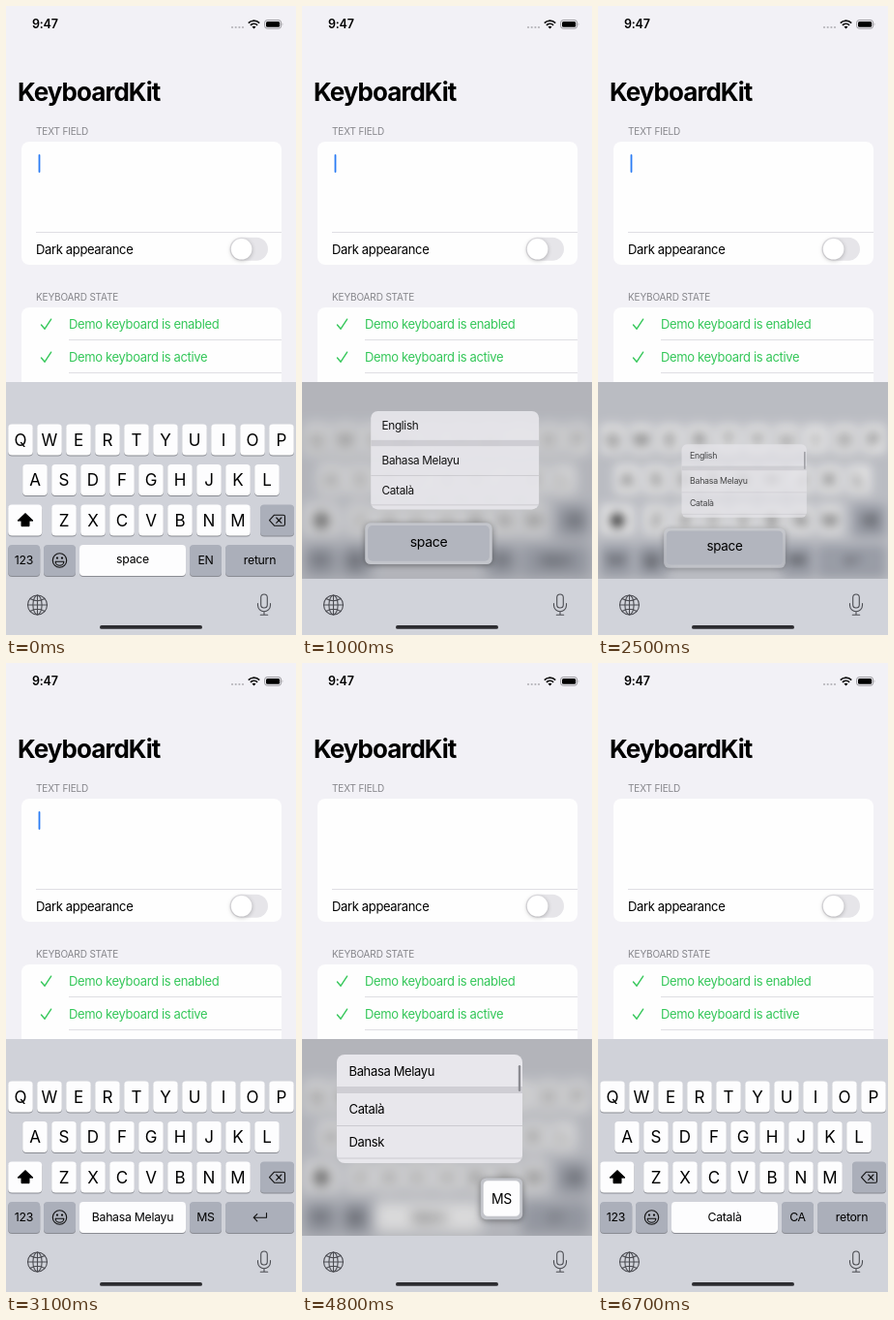
An HTML page that plays this animation: 300x649 px, repeating every 6900 ms.

```html
<!DOCTYPE html>
<html lang="en">
<head>
<meta charset="utf-8">
<title>Keyboard locale menu</title>
<style>
@property --t { syntax: '<number>'; inherits: true; initial-value: 0; }
@keyframes clock { to { --t: 6900; } }

html, body { margin: 0; width: 100%; height: 100%; overflow: hidden; background: #f2f1f6; }

/* The picture advances ten times a second; the small lead avoids rounding at the steps. */
svg {
  display: block; width: 300px; height: 649px;
  font: 13px Inter, Roboto, sans-serif; letter-spacing: -.35px;
  animation: clock 6.9s -10ms steps(69) infinite;
}
.mid { text-anchor: middle; }
.cap { font-size: 10px; letter-spacing: -.15px; fill: #85858a; }
.letter { font-size: 17px; letter-spacing: 0; }
.small { font-size: 12.3px; letter-spacing: -.28px; }
.green { fill: #34c759; }
.line { fill: none; stroke: #dfdee3; }
.icon { fill: none; stroke: #4b4c52; stroke-width: 1.1; stroke-linecap: round; stroke-linejoin: round; }
.dark { stroke: #111; }

.caret {
  --phase: mod(var(--t), 1000);
  opacity: calc(1 - clamp(0, (var(--phase) - 500) / 200, 1) + clamp(0, (var(--phase) - 800) / 200, 1));
}

.board {
  --dim: calc(clamp(0, (var(--t) - 500) / 450, 1) - clamp(0, (var(--t) - 2350) / 600, 1)
            + clamp(0, (var(--t) - 4270) / 450, 1) - clamp(0, (var(--t) - 5900) / 600, 1));
  --first: clamp(0, var(--t) - 2450, 1);
  --second: clamp(0, var(--t) - 5950, 1);
  --fade: clamp(0, (var(--t) - 3450) / 350, 1);
}
.keys { filter: blur(calc(var(--dim) * 7px)); }
.shade { opacity: calc(var(--dim) * .14); }
.en { opacity: calc(1 - var(--first)); }
.ms { opacity: calc(var(--first) - var(--second)); }
.name { opacity: calc((var(--first) - var(--second)) * (1 - var(--fade))); }
.plain { opacity: calc((var(--first) - var(--second)) * var(--fade)); }
.ca { opacity: var(--second); }

/* Long press: --down touch, --open menu appears, --close item chosen, --up key released */
.space { --down: 50; --open: 800; --close: 2350; --up: 2950; --x: 131px; }
.locale { --down: 3850; --open: 4350; --close: 5900; --up: 6450; --x: 206.5px; }
.space, .locale {
  --held: calc(clamp(0, var(--t) - var(--down), 1) - clamp(0, var(--t) - var(--up), 1));
  --rest: calc(1 - clamp(0, (var(--t) - var(--open)) / 290, 1));
  --shut: calc(1 - clamp(0, (var(--t) - var(--close)) / 450, 1));
  --menu: calc((1 - var(--rest) * var(--rest)) * var(--shut));
  --lift: calc(clamp(0, (var(--t) - var(--open) + 200) / 200, 1) * var(--shut));
}
.base { opacity: calc(1 - var(--held)); }
.raised {
  opacity: var(--held);
  transform-origin: var(--x) 572px;
  transform: translateY(calc(var(--menu) * -19.5px)) scale(calc(1 + var(--lift) * .18 - var(--menu) * .04));
}
.halo { opacity: var(--lift); filter: drop-shadow(0 1px 3px #0006); }
.menu {
  opacity: var(--menu);
  transform-origin: var(--x) 552px;
  transform: scale(calc(.02 + var(--menu) * .98));
}
.thumb { opacity: clamp(0, var(--t) - var(--open) - 350, 1); }
</style>
</head>
<body>
<script>
const text = (x, y, s, cls = '') => `<text x="${x}" y="${y}" class="${cls}">${s}</text>`;
const rect = (x, y, w, h, r, fill, more = '') =>
  `<rect x="${x}" y="${y}" width="${w}" height="${h}" rx="${r}" fill="${fill}" ${more}/>`;
const path = (d, cls, more = '') => `<path d="${d}" class="${cls}" ${more}/>`;
const group = (cls, ...parts) => `<g class="${cls}">${parts.join('')}</g>`;

const white = '#fdfdfe', grey = '#abafba';

const key = (x, y, w, fill, label = '') =>
  rect(x, y + 1, w, 32, 4, '#8a8c93') + rect(x, y, w, 32, 4, fill) + label;

const row = (letters, first, y) => [...letters].map((c, i) => {
  const x = first + i * 30;
  return key(x - 12.8, y, 25.6, white, text(x, y + 22.3, c, 'letter mid'));
}).join('');

const menu = (x, items) => group('menu',
  rect(x, 404, 192, 112, 8, '#e8e7ec'),
  rect(x, 437, 192, 7, 0, '#cfced4'),
  path(`M${x} 477.5h192M${x} 511h192`, 'line', 'style="stroke:#cbcad0"'),
  ...items.map((s, i) => text(x + 12.5, [425.5, 465, 498.7][i], s)),
  group('thumb', rect(x + 187.8, 415, 2.4, 27, 1.2, '#8c8c92')));

const raised = (x, w, fill, label) => group('raised',
  group('halo', rect(x - 2.5, 553.5, w + 5, 37.5, 5, '#c3c5cb')),
  rect(x, 556, w, 32, 4, fill), label);

const check = y => path(`M36.5 ${y + 1}l3.6 4.2 6.6-10`, 'icon', 'style="stroke:#34c759;stroke-width:1.4"');

const status = text(27, 23.3, '9:47', '" style="font-size:12.5px;font-weight:600;letter-spacing:-.2px')
  + [234, 237.7, 241.4, 245].map(x => `<circle cx="${x}" cy="22" r="1.1" fill="#b4b3b8"/>`).join('')
  + path('M250.8 17.6a8 8 0 0 1 11.4 0M252.9 19.8a5 5 0 0 1 7.2 0', 'icon dark', 'style="stroke-width:1.7;stroke-linecap:butt"')
  + path('M256.5 23.6l-2-2a2.9 2.9 0 0 1 4 0z', '')
  + rect(267.6, 14.6, 17, 8.6, 2.6, 'none', 'stroke="#8f8e93" stroke-width=".9"')
  + rect(269, 16, 14.2, 5.8, 1.5, '#000')
  + path('M285.8 17.3q1.2 1.5 0 3.2z', '', 'fill="#8f8e93"');

const form = text(12, 98, 'KeyboardKit', '" style="font-size:26px;font-weight:700;letter-spacing:-.95px')
  + text(31, 132.7, 'TEXT FIELD', 'cap')
  + rect(16, 140, 269, 127, 8, '#fefefe')
  + rect(33.6, 153, 1.8, 19, .9, '#2b7cf5', 'class="caret"')
  + path('M31 233.5H285M65 0', 'line')
  + text(31, 255.6, 'Dark appearance')
  + rect(231.5, 238.7, 39.5, 24, 12, '#e6e5e9')
  + '<circle cx="243.6" cy="250.8" r="10.8" fill="#fff" style="filter:drop-shadow(0 1.5px 2px #0004)"/>'
  + text(31, 303.7, 'KEYBOARD STATE', 'cap')
  + rect(16, 311, 269, 100, 8, '#fefefe')
  + path('M65 344.5H285M65 378.5H285', 'line')
  + check(328) + text(65, 332.6, 'Demo keyboard is enabled', 'green')
  + check(362) + text(65, 366.6, 'Demo keyboard is active', 'green');

const shift = path('M20 523.5l8 7.6h-4v5.6h-8v-5.6h-4z', '', 'stroke="#000" stroke-linejoin="round"');
const erase = path('M277.5 525.2h9.6q1.4 0 1.4 1.4v8.2q0 1.4-1.4 1.4h-9.6l-5-5.5zM279.7 528l5.2 5.4m0-5.4l-5.2 5.4', 'icon dark');
const smile = '<circle cx="55.5" cy="572" r="7.2" class="icon dark"/>'
  + path('M51.2 573.2h8.6a4.3 4.1 0 0 1-8.6 0z', 'icon dark')
  + '<circle cx="53" cy="569.6" r="1.1"/><circle cx="58" cy="569.6" r="1.1"/>';
const enter = path('M269.5 567.5v4.7h-13.3m3.6-3.6l-3.6 3.6 3.6 3.6', 'icon dark ms');

const spaceLabels = text(131, 575, 'space', 'small mid en')
  + text(131, 576.4, 'Bahasa Melayu', 'small mid name')
  + text(131, 576.4, 'Space', 'small mid plain')
  + text(131, 576.4, 'Català', 'small mid ca');
const codeLabels = ['EN', 'MS', 'CA'].map(s => text(206.5, 576.4, s, 'small mid ' + s.toLowerCase())).join('');

const board = group('board',
  rect(0, 388, 300, 261, 0, '#d1d3da'),
  '<g clip-path="url(#pane)">',
  group('keys',
    rect(-60, 330, 420, 330, 0, '#d0d2d9'),
    row('QWERTYUIOP', 15, 431.5),
    row('ASDFGHJKL', 30, 473),
    row('ZXCVBNM', 60, 514.5),
    key(2.2, 514.5, 35, white, shift),
    key(263, 514.5, 35, grey, erase),
    key(2.2, 556, 33, grey, text(18.5, 576.4, '123', 'small mid')),
    key(39, 556, 33, grey, smile),
    group('space', group('base', key(76, 556, 110, white, spaceLabels))),
    group('locale', group('base', key(190, 556, 33, grey, codeLabels))),
    key(227, 556, 71, grey,
      text(262.5, 576.4, 'return', 'small mid en') + enter + text(262.5, 576.4, 'retorn', 'small mid ca'))),
  rect(0, 388, 300, 203, 0, '#000', 'class="shade"'),
  '</g>',
  '<circle cx="32.5" cy="618" r="10" class="icon"/><ellipse cx="32.5" cy="618" rx="4.6" ry="10" class="icon"/>',
  path('M32.5 608v20M22.5 618h20M25 611.6q7.5 4.2 15 0M25 624.4q7.5-4.2 15 0', 'icon'),
  rect(263.7, 607, 6.6, 14, 3.3, 'none', 'style="stroke:#4b4c52;stroke-width:1.1"'),
  path('M260.5 616.5v1.8a6.5 6.5 0 0 0 13 0v-1.8M267 625v3.3M263.3 628.3h7.4', 'icon'),
  rect(97, 639, 106, 3.8, 1.9, '#2c2c30'),
  group('space',
    menu(65, ['English', 'Bahasa Melayu', 'Català']),
    raised(76, 110, '#b2b5be', text(131, 575, 'space', 'small mid'))),
  group('locale',
    menu(36, ['Bahasa Melayu', 'Català', 'Dansk']),
    raised(190, 33, white, text(206.5, 576.4, 'MS', 'small mid'))));

document.body.innerHTML = `<svg viewBox="0 0 300 649">
  <clipPath id="pane"><rect y="388" width="300" height="203"/></clipPath>
  <rect width="300" height="649" fill="#f2f1f6"/>${status}${form}${board}</svg>`;
</script>
</body>
</html>
```
